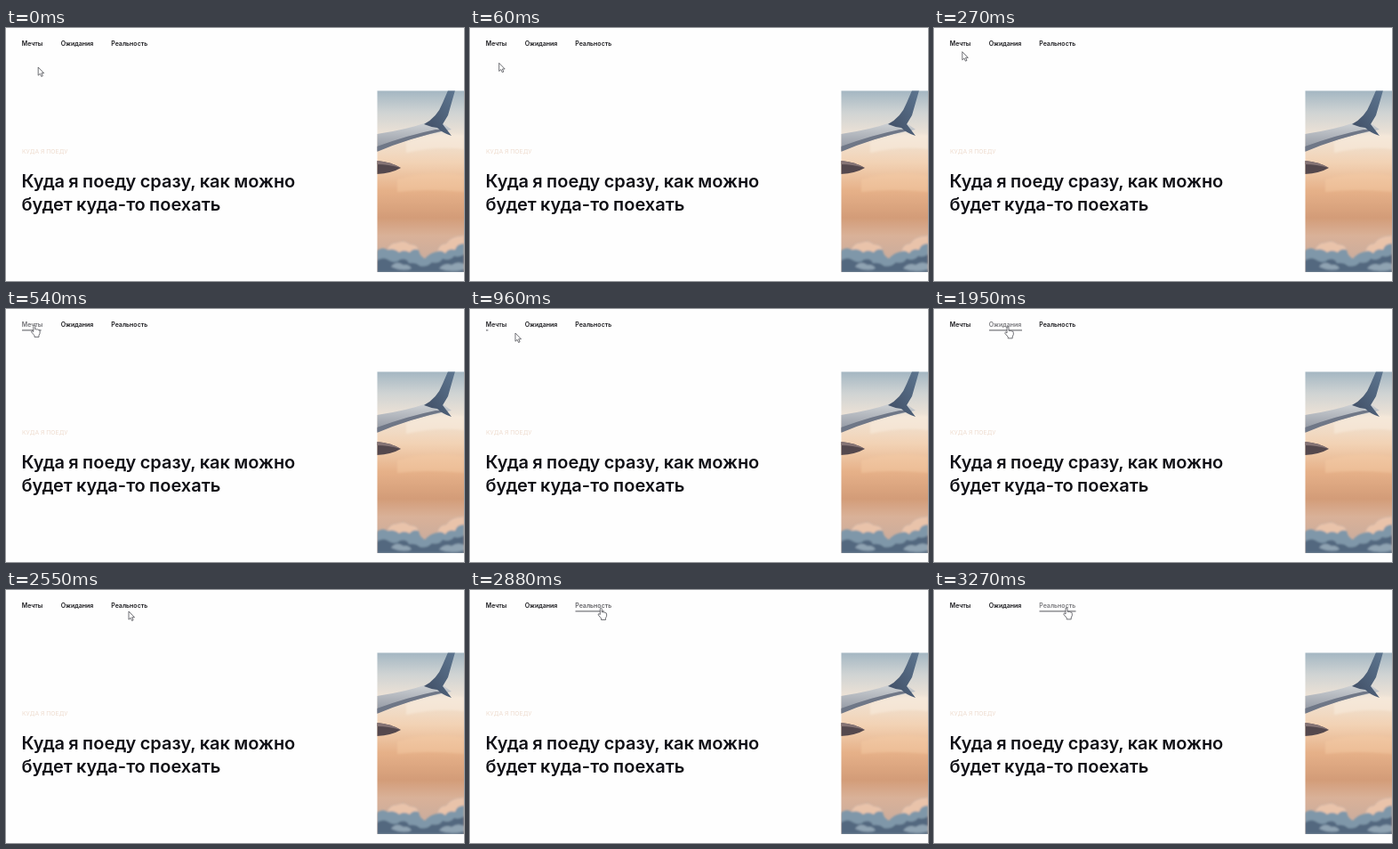
Write an HTML page that moves like this. It is 515 px wide and 284 px high and loops after 3600 ms.

```html
<!DOCTYPE html>
<html lang="ru">
<meta charset="utf-8">
<title>Мечты</title>
<style>
  html, body { margin: 0; width: 100%; height: 100%; overflow: hidden; background: #fefefe; }
  svg { display: block; width: 515px; height: 284px; font-family: Inter, sans-serif; }
  .nav { font-size: 7px; font-weight: 600; }
  .kicker { font-size: 6.8px; fill: #eedccf; }
  .title { font-size: 20px; font-weight: 600; word-spacing: -.7px; fill: #101016; }
</style>
<svg viewBox="0 0 515 284">
  <defs>
    <linearGradient id="sky" x2="0" y2="1">
      <stop offset="0" stop-color="#a3b6c2"/>
      <stop offset=".12" stop-color="#cfd3d3"/>
      <stop offset=".25" stop-color="#efe3d6"/>
      <stop offset=".4" stop-color="#f2d2b4"/>
      <stop offset=".55" stop-color="#e6b189"/>
      <stop offset=".7" stop-color="#d39c78"/>
      <stop offset=".8" stop-color="#d9b198"/>
      <stop offset="1" stop-color="#c3aa9f"/>
    </linearGradient>
    <linearGradient id="wing" x2="0" y2="1">
      <stop offset="0" stop-color="#d3d6d8"/>
      <stop offset="1" stop-color="#8d939f"/>
    </linearGradient>
    <linearGradient id="tip" x1="1" x2="0" y2="1">
      <stop offset="0" stop-color="#5d7690"/>
      <stop offset="1" stop-color="#3f4c63"/>
    </linearGradient>
    <filter id="soft" x="-20%" y="-20%" width="140%" height="140%"><feGaussianBlur stdDeviation="1.2"/></filter>
    <clipPath id="frame"><rect x="417.5" y="70.5" width="98" height="203.5"/></clipPath>
  </defs>

  <g id="menu" class="nav"></g>
  <text class="kicker" x="18" y="141">КУДА Я ПОЕДУ</text>
  <text class="title" x="17.5" y="179.3">Куда я поеду сразу, как можно</text>
  <text class="title" x="17.5" y="204.5">будет куда-то поехать</text>

  <g clip-path="url(#frame)">
    <path fill="url(#sky)" d="M417 70h98v204h-98z"/>
    <g filter="url(#soft)">
      <path fill="#f8ebdd" opacity=".6" d="M450 128q30-12 65-8v16q-30-4-65 4z"/>
      <path fill="#f3c9a4" opacity=".5" d="M440 170q40-12 75-4v18q-40-4-75 0z"/>
      <path fill="#7f97a9" d="M417 250q6-5 12-1 2-8 11-8 8-4 14 2 8-1 10 6 1 7 7 10 6-7 14-8 2-9 10-9 4-8 20-9v42h-98z"/>
      <path fill="#e9c3aa" d="M429 249q2-8 11-8 8-4 14 2 8-1 10 6-7-2-10 3-7-4-12 0-5-5-13-3zM485 251q2-9 10-9 4-8 20-9v9q-8 0-10 7-8-2-11 4-4-4-9-2z"/>
      <path fill="#52687f" d="M417 261q8-5 14 0 7 4 12-1 8-2 10 4 8-1 12 3 8 2 14-4 8 2 12-4 8 3 13-3 6 2 11-2v20h-98z"/>
      <path fill="#8fa3b2" d="M433 268q6-8 14-2 6-1 9 4-10 4-23-2zM487 270q6-7 14-4 7-5 14-1v6q-15 4-28-1z"/>
    </g>
    <path fill="url(#wing)" d="M417 119q34-5 56-13l14-2 14 10q-48 9-84 24z"/>
    <path fill="#6f7787" d="M417 133q36-13 66-19l14 0q-45 10-80 25z"/>
    <path fill="url(#tip)" d="M470 108q15-8 21-24l6-14h8l-8 28-6 10 10 13q-10-3-16-9-8-1-15-4z"/>
    <path fill="#54484d" d="M417 149q15 1 27 8-10 6-27 7z"/>
    <path fill="#857475" d="M417 149q15 1 27 8-14-4-27-4z"/>
  </g>

  <g id="cursor" stroke="#4c4d54" stroke-width=".8" stroke-linejoin="round" fill="#fff">
    <path id="arrow" d="M0 0v9.2l2.1-1.9 1.5 3.2 1.5-.7-1.4-3.1h2.8z"/>
    <path id="hand" d="M-1 1q0-1.3 1-1.3t1 1.3v3.4q1-.8 1.8.2 1.1-.7 1.8.4 1.6-.3 1.7 1.4v2.4l-1.1 2.2v1.9h-5v-1.6l-3.2-3.7q-.6-1.3.6-1.6l1.4 1z"/>
  </g>
</svg>
<script>
  const LOOP = 3600, $ = id => document.getElementById(id);
  const links = [
    { label: 'Мечты', x: 18, w: 24, from: 380, to: 800 },
    { label: 'Ожидания', x: 62, w: 37, from: 1560, to: 2170 },
    { label: 'Реальность', x: 118.5, w: 41, from: 2740, to: LOOP },
  ];
  // Cursor path: time, x, y of the hot spot
  const path = [
    [0, 36.2, 44], [60, 32.7, 39.3], [380, 31.5, 22], [540, 31.8, 18.5], [720, 33, 19],
    [1020, 53, 28], [1410, 78, 24], [1620, 82, 20.5], [1950, 83, 20], [2120, 85, 20.5],
    [2330, 112, 27], [2550, 138, 24], [2780, 146, 21], [3000, 149, 20], [LOOP, 149, 20],
  ];
  const clamp = v => Math.max(0, Math.min(1, v));
  const ease = v => v * v * (3 - 2 * v);

  function add(tag, attrs, text = '') {
    const el = document.createElementNS('http://www.w3.org/2000/svg', tag);
    for (const k in attrs) el.setAttribute(k, attrs[k]);
    el.textContent = text;
    return $('menu').appendChild(el);
  }
  for (const l of links) {
    l.text = add('text', { x: l.x - .3, y: 20 }, l.label);
    l.line = add('rect', { x: l.x, y: 23.4, height: 1, fill: '#55565c' });
  }

  function position(t) {
    const i = path.findIndex(p => p[0] > t), [a, ax, ay] = path[i - 1], [b, bx, by] = path[i];
    const k = ease((t - a) / (b - a));
    return [ax + (bx - ax) * k, ay + (by - ay) * k];
  }

  function draw(now) {
    const t = now % LOOP;
    let over = false;
    for (const l of links) {
      const k = ease(clamp((t - l.from) / 200) * (1 - clamp((t - l.to) / 200)));
      const c = Math.round(24 + 95 * k);
      l.text.setAttribute('fill', `rgb(${c},${c},${c + 4})`);
      l.line.setAttribute('width', l.w * k);
      over ||= t >= l.from && t < l.to;
    }
    $('cursor').setAttribute('transform', `translate(${position(t)})`);
    $('hand').style.display = over ? '' : 'none';
    $('arrow').style.display = over ? 'none' : '';
    requestAnimationFrame(draw);
  }
  requestAnimationFrame(draw);
</script>
</html>
```
